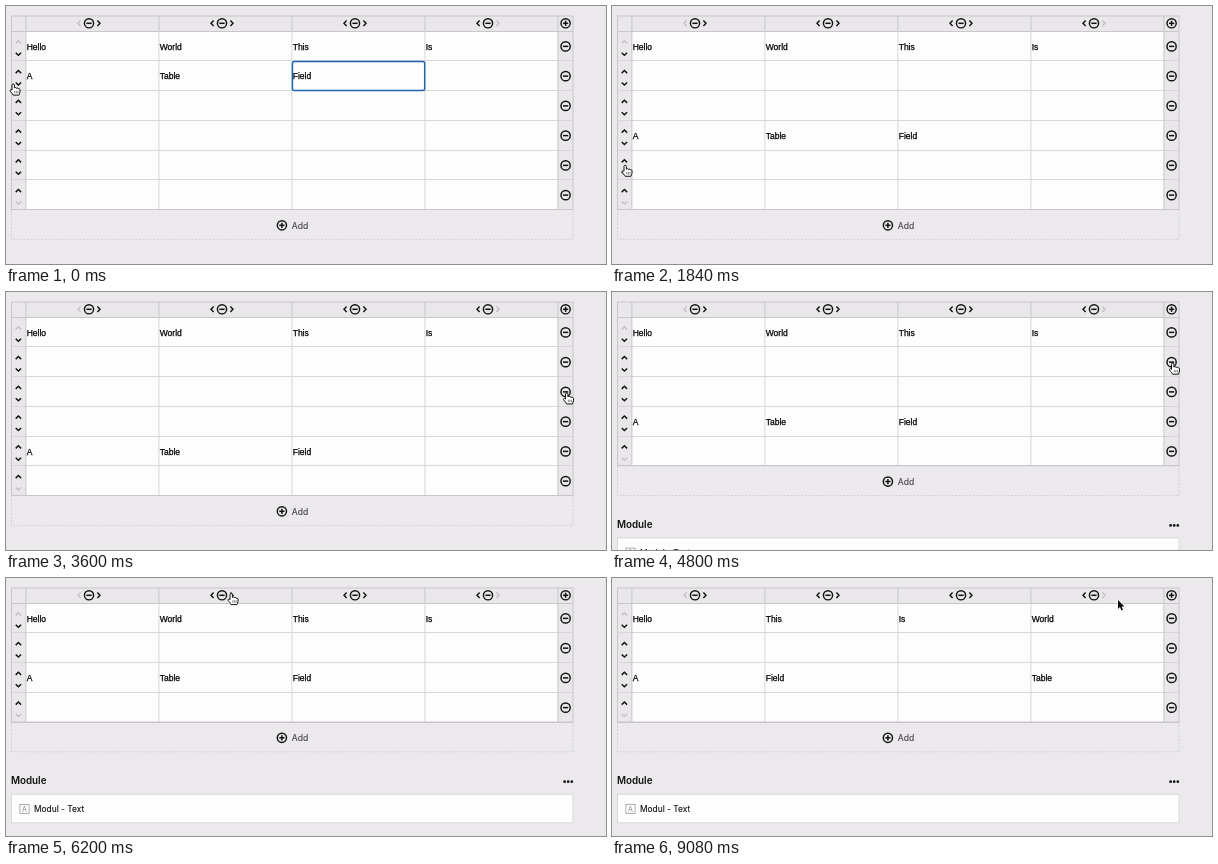
An HTML page with a canvas that plays this animation: 600x258 px, repeating every 9.12 s.

```html
<!DOCTYPE html>
<html lang="en">
<head>
<meta charset="utf-8">
<title>Table field</title>
<style>
html, body { margin: 0; width: 100%; height: 100%; overflow: hidden; background: #ebe9ec; }
canvas { display: block; width: 600px; height: 258px; }
</style>
</head>
<body>
<canvas id="stage" width="600" height="258"></canvas>
<script>
const ctx = document.getElementById('stage').getContext('2d');
const LOOP = 9120, TICK = 40;
const LEFT = 5.5, RIGHT = 567, TOP = 10, HEAD = 25, ROW = 29.75;
const INK = '#111', FAINT = '#c3c1c3', PAGE = '#ebe9ec', CELL = '#fefdfe';
const ARIAL = '8.5px "Liberation Sans", Arial, sans-serif';
const UI = 'Inter, Roboto, sans-serif';
const FIRST = ['Hello', 'World', 'This', 'Is'];
const SECOND = ['A', 'Table', 'Field', ''];

// Layout rules
const colX = c => 19.9 + 133 * c;
const iconX = c => 83 + 133 * c;
const rowY = r => HEAD + (r + 0.5) * ROW + 0.5;
const downButton = r => [13.5, rowY(r) + 8];
const removeButton = r => [561, rowY(r) + 1];
const rightButton = c => [iconX(c) + 9.5, 15.5];

// Pointer journeys: goal, with an optional sideways sway on the way
const HOME = [7.5, 78];
const MOVES = [
  { from: 0, to: 160, goal: [11, 78.5] },
  { from: 720, to: 1200, goal: downButton(2) },
  { from: 1520, to: 2160, goal: downButton(3), sway: [0, 41] },
  { from: 2560, to: 2720, goal: [234.5, 209] },
  { from: 2720, to: 3600, goal: removeButton(2), sway: [150, 0] },
  { from: 4360, to: 4800, goal: removeButton(1) },
  { from: 5360, to: 5560, goal: [307.5, 42.5] },
  { from: 5720, to: 6200, goal: rightButton(1) },
  { from: 7520, to: 8280, goal: rightButton(2), sway: [105, 8] },
  { from: 8880, to: 9080, goal: [506, 22] }
];

function pointerAt(t) {
  let spot = HOME;
  for (const { from, to, goal, sway = [0, 0] } of MOVES) {
    if (t <= from) break;
    const u = Math.min(1, (t - from) / (to - from));
    const s = 1 - (1 - u) ** 2, arc = Math.sin(Math.PI * s);
    spot = spot.map((v, k) => v + (goal[k] - v) * s + sway[k] * arc);
  }
  return spot;
}

// Value that holds after each listed time
function at(t, first, ...changes) {
  let value = first;
  for (const [time, next] of changes) if (t >= time) value = next;
  return value;
}

function stateAt(t) {
  const rows = at(t, 6, [4040, 5], [5080, 4]);
  return {
    rows,
    bottom: HEAD + rows * ROW,
    filled: at(t, 1, [520, 2], [1520, 3], [2440, 4], [4040, 3], [5080, 2]),
    order: at(t, [0, 1, 2, 3], [6920, [0, 2, 1, 3]], [8640, [0, 2, 3, 1]]),
    focus: t < 320
  };
}

function pointerKind([x, y], bottom) {
  if (x < LEFT || x > RIGHT || y < TOP || y > bottom + ROW) return 'arrow';
  if (y > bottom) return 'hand';
  if (y < HEAD) return FIRST.some((_, c) => Math.abs(x - iconX(c)) < 14) ? 'hand' : 'arrow';
  return x > colX(0) && x < colX(4) ? 'beam' : 'hand';
}

function text(str, x, y, font, color = INK, weight = 0) {
  ctx.font = font;
  ctx.fillStyle = ctx.strokeStyle = color;
  ctx.fillText(str, x, y);
  if (weight) {
    ctx.lineWidth = weight;
    ctx.strokeText(str, x, y);
  }
}

function line(points, color, width = 1) {
  ctx.beginPath();
  points.forEach(([x, y]) => ctx.lineTo(x, y));
  ctx.strokeStyle = color;
  ctx.lineWidth = width;
  ctx.stroke();
}

function badge(x, y, plus) {
  ctx.beginPath();
  ctx.arc(x, y, 4.6, 0, Math.PI * 2);
  ctx.strokeStyle = INK;
  ctx.lineWidth = 1.45;
  ctx.stroke();
  line([[x - 2.6, y], [x + 2.6, y]], INK, 1.5);
  if (plus) line([[x, y - 2.6], [x, y + 2.6]], INK, 1.5);
}

function chevron(x, y, dx, dy, on) {
  const points = [-1, 0, 1].map(s => {
    const f = s ? -1.3 : 1.3;
    return [x + dx * f + dy * s * 2.7, y + dy * f + dx * s * 2.7];
  });
  line(points, on ? INK : FAINT, 1.4);
}

function drawTable({ rows, bottom, filled, order, focus }) {
  const grid = '#d8d6d9', edge = '#c8c6c9';
  ctx.fillStyle = '#e9e7e9';
  ctx.fillRect(LEFT, TOP, RIGHT - LEFT, bottom - TOP);
  ctx.fillStyle = CELL;
  ctx.fillRect(colX(0), HEAD, colX(4) - colX(0), bottom - HEAD);

  for (let r = 0; r <= rows; r++) {
    const y = Math.round(HEAD + r * ROW - 0.5) + 0.5;
    line([[LEFT, y], [RIGHT, y]], r % rows ? grid : edge);
  }
  for (let c = 0; c <= 4; c++) {
    const x = colX(c);
    line([[x, HEAD], [x, bottom]], c % 4 ? grid : edge);
    line([[x, TOP], [x, HEAD]], edge);
  }
  ctx.strokeRect(LEFT, TOP, RIGHT - LEFT, bottom - TOP);

  order.forEach((item, c) => {
    const x = iconX(c), tx = colX(c) + 0.8;
    chevron(x - 9.7, 17.3, -1, 0, c > 0);
    badge(x, 17.3);
    chevron(x + 9.7, 17.3, 1, 0, c < 3);
    text(FIRST[item], tx, rowY(0) + 3.2, ARIAL, '#000', 0.25);
    text(SECOND[item], tx, rowY(filled) + 3.2, ARIAL, '#000', 0.25);
  });
  badge(559.6, 17.3, true);
  for (let r = 0; r < rows; r++) {
    const y = rowY(r);
    chevron(12.4, y - 4.3, 0, -1, r > 0);
    chevron(12.4, y + 7.6, 0, 1, r < rows - 1);
    badge(559.6, y);
  }
  if (focus) {
    ctx.beginPath();
    ctx.roundRect(colX(2) + 0.5, HEAD + ROW + 0.8, 132.3, 29, 2);
    ctx.strokeStyle = '#2065a8';
    ctx.lineWidth = 1.5;
    ctx.stroke();
  }
}

function drawAdd(y, hover) {
  ctx.setLineDash([2, 1.5]);
  line([[LEFT, y], [LEFT, y + 29.8], [RIGHT, y + 29.8], [RIGHT, y]], '#cfcdd0', 0.9);
  ctx.setLineDash([]);
  badge(275.9, y + 15.8, true);
  text('Add', 285.8, y + 19, '8.6px ' + UI, hover ? INK : '#444345', 0.12);
}

function drawModule(y) {
  text('Module', 5, y + 33, '600 9.8px ' + UI);
  ctx.fillStyle = INK;
  for (const x of [558.6, 562.2, 565.8]) {
    ctx.beginPath();
    ctx.arc(x, y + 30.4, 1.35, 0, Math.PI * 2);
    ctx.fill();
  }
  ctx.fillStyle = CELL;
  ctx.strokeStyle = '#dad8db';
  ctx.lineWidth = 1;
  ctx.fillRect(LEFT, y + 43, RIGHT - LEFT, 28.5);
  ctx.strokeRect(LEFT, y + 43, RIGHT - LEFT, 28.5);
  ctx.strokeStyle = '#9a989b';
  ctx.lineWidth = 0.8;
  ctx.strokeRect(13.9, y + 53.1, 9.2, 9.2);
  text('A', 16, y + 60.3, '7px ' + UI, '#858386');
  text('Modul - Text', 28, y + 60.9, '8.4px ' + UI, INK, 0.12);
}

const HAND = new Path2D('M-1.5 6.2V1.1C-1.5-.3 .9-.3 .9 1.1V4C1.3 3.2 3 3.4 3 4.4' +
  'C3.5 3.6 4.9 3.9 4.9 4.9C5.5 4.4 6.5 4.7 6.5 5.7V7.9C6.5 9.4 5.6 9.7 5.4 11.1H-.4' +
  'C-.7 9.7-2.4 8.6-3.3 7C-3.9 5.7-2.4 5.1-1.5 6.2Z');
const ARROW = new Path2D('M0 0V9L2 7.1L3.4 10.4L5 9.7L3.6 6.5H6.4Z');
const BEAM = new Path2D('M-2-6Q0-6 0-5V5Q0 6-2 6M2-6Q0-6 0-5M0 5Q0 6 2 6');

function drawPointer([x, y], kind) {
  ctx.save();
  ctx.translate(x, y);
  ctx.lineJoin = 'round';
  if (kind === 'hand') {
    ctx.fillStyle = '#fff';
    ctx.strokeStyle = '#111';
    ctx.lineWidth = 1;
    ctx.fill(HAND);
    ctx.stroke(HAND);
    for (const fx of [1.3, 2.9, 4.5]) line([[fx, 6.8], [fx, 9.3]], '#444', 0.65);
  } else if (kind === 'arrow') {
    ctx.strokeStyle = '#fff';
    ctx.lineWidth = 1.6;
    ctx.stroke(ARROW);
    ctx.fillStyle = '#0a0a0a';
    ctx.fill(ARROW);
  } else {
    ctx.strokeStyle = '#222';
    ctx.lineWidth = 0.9;
    ctx.stroke(BEAM);
  }
  ctx.restore();
}

function draw(t) {
  const state = stateAt(t), spot = pointerAt(t);
  const kind = pointerKind(spot, state.bottom);
  ctx.fillStyle = PAGE;
  ctx.fillRect(0, 0, 600, 258);
  drawAdd(state.bottom, kind === 'hand' && spot[1] > state.bottom);
  drawTable(state);
  drawModule(state.bottom + ROW - 0.5);
  drawPointer(spot, kind);
}

const start = performance.now();
function frame() {
  const t = (performance.now() - start) % LOOP;
  draw(Math.floor(t / TICK) * TICK);
  requestAnimationFrame(frame);
}
frame();
</script>
</body>
</html>
```
